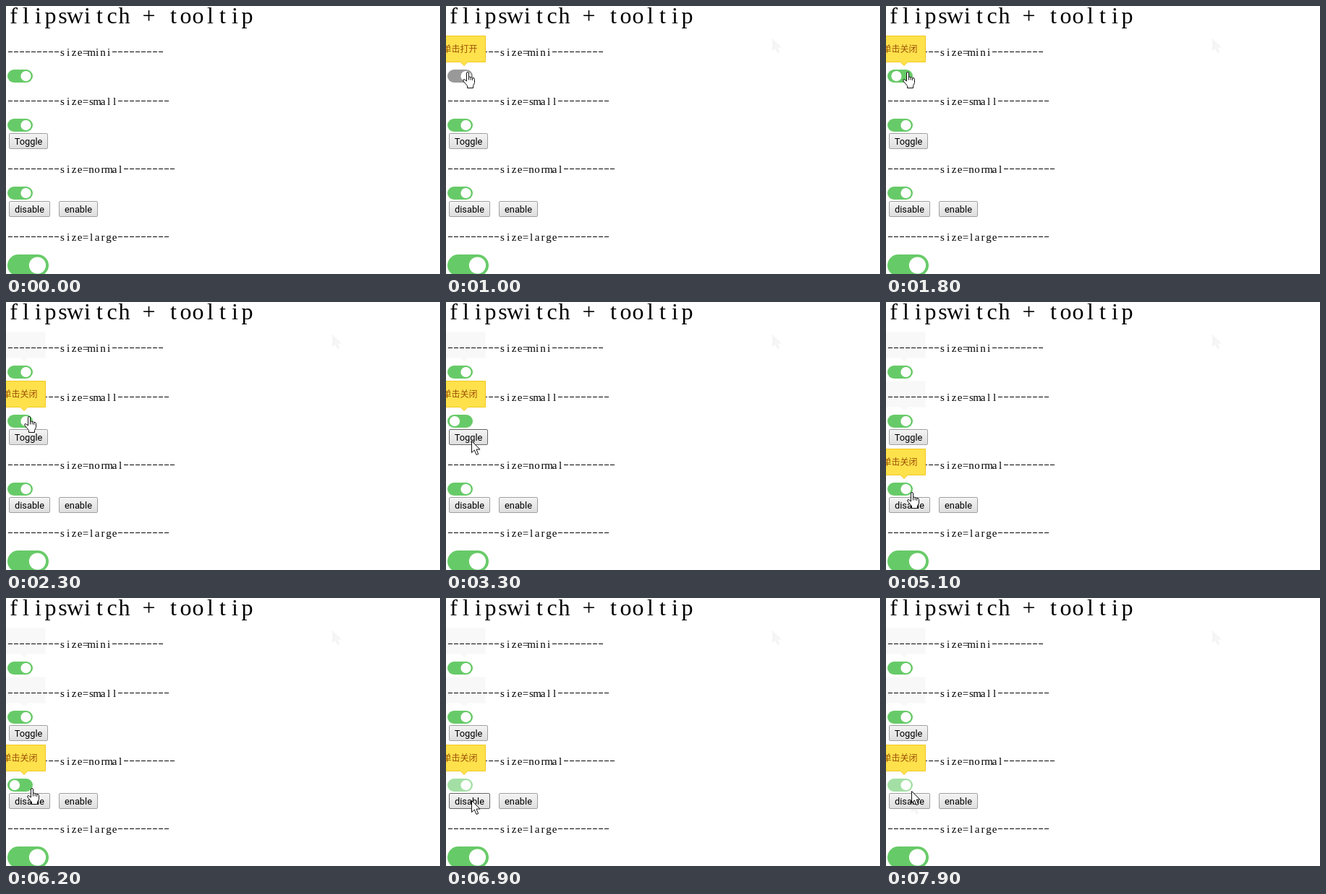
Animation, 600 px wide and 371 px high, one loop 8000 ms. Source, as an HTML page with a canvas:

```html
<!DOCTYPE html>
<html lang="en">
<head>
<meta charset="utf-8">
<title>flipswitch + tooltip</title>
<style>
  html, body { margin: 0; width: 100%; height: 100%; overflow: hidden; background: #fff; }
  canvas { display: block; }
</style>
</head>
<body>
<canvas id="stage" width="600" height="371"></canvas>
<script>
const ctx = document.getElementById('stage').getContext('2d');
const LOOP = 8000, STEP = 100;
const SERIF = '"Liberation Serif", serif';
const SANS = 'Roboto, sans-serif';
const CJK = '"Noto Sans CJK SC", "Noto Sans CJK", sans-serif';
const GHOST = '#f8f8f8', CURSOR_GHOST = '#f5f5f5';

// flips: [start, duration]; every flip inverts the switch, which begins on.
const switches = [
  { name: 'mini', label: 69, top: 88, flips: [[1000, 400], [1700, 400]], tip: [500, 2200] },
  { name: 'small', label: 137, top: 156, flips: [[2600, 400], [3300, 300], [4000, 300], [4500, 300]], tip: [2100, 5000] },
  { name: 'normal', label: 231, top: 250, flips: [[5600, 400], [6200, 400]], tip: [4900, LOOP], disabledAt: 6900 },
  { name: 'large', label: 325, top: 344, width: 57, height: 30, radius: 11.6, flips: [] }
];

const buttons = [
  { text: 'Toggle', x: 4, y: 176, w: 54, hover: [3200, 4900], presses: [[3200, 3300], [3800, 4000]] },
  { text: 'disable', x: 4, y: 270, w: 57, hover: [6600, 7100], presses: [[6800, 6900]] },
  { text: 'enable', x: 73, y: 270, w: 54, hover: [0, 0], presses: [] }
];

// [start, kind, x, y]
const cursorKeys = [
  [0, null, 0, 0],
  [300, 'arrow', 451, 45],
  [400, 'hand', 23, 91],
  [2200, 'hand', 25, 158],
  [2400, 'hand', 25, 161],
  [3200, 'arrow', 35, 192],
  [4900, 'arrow', 35, 225],
  [5000, 'hand', 29, 263],
  [6600, 'arrow', 35, 280],
  [7100, 'arrow', 35, 274],
  [7200, 'arrow', 35, 270],
  [7300, 'no', 35, 267],
  [7900, 'arrow', 35, 267]
];

const arrowPath = new Path2D('M.5 .5V16.6L4.3 13L7 19.5L9.7 18.4L7 12.1H12Z');
const handPath = new Path2D('M5.5 13V2Q5.5 .5 7 .5Q8.5 .5 8.5 2V7.5Q9.8 6.3 11.2 7.8' +
  'Q12.6 7 13.7 8.6Q16.5 8 16.5 10.5V15.5L14.5 19.5V22.5H6.5V19.5L1 13Q0 10.5 2.2 10.5Z');
const knucklePath = new Path2D('M8.5 7.5V11.5M11.2 8V11.5M13.7 8.6V12');
const tipPath = new Path2D('M-9 .5H54.5V36.5H30L25 41.5L20 36.5H-9Z');

const within = (t, [from, to]) => t >= from && t < to;
const clamp = v => Math.max(0, Math.min(1, v));

function write(text, x, y, font, color = '#000', align = 'left') {
  ctx.font = font;
  ctx.fillStyle = color;
  ctx.textAlign = align;
  ctx.fillText(text, x, y);
}

// Sets each letter in the middle of a fixed-width cell.
function writeGrid(text, x, y, cell, size) {
  [...text].forEach((letter, i) =>
    write(letter, x + (i + 0.5) * cell, y, `${size}px ${SERIF}`, '#000', 'center'));
}

function shape(path, x, y, fill, stroke) {
  ctx.save();
  ctx.translate(x, y);
  ctx.fillStyle = fill;
  ctx.fill(path);
  if (stroke) {
    ctx.lineWidth = 1;
    ctx.strokeStyle = stroke;
    ctx.stroke(path);
  }
  ctx.restore();
}

function rule(x, y) {
  ctx.fillStyle = '#000';
  for (let i = 0; i < 9; i++) ctx.fillRect(x + i * 8 + 1, y, 6, 1);
}

function drawLabel({ name, label }) {
  const text = 'size=' + name;
  rule(2, label - 6);
  writeGrid(text, 74, label, 8, 15);
  rule(74 + text.length * 8, label - 6);
}

// on: logical state; pos: knob position, 1 at the right
function stateAt(sw, t) {
  let on = true, pos = 1;
  for (const [start, duration] of sw.flips) {
    if (t < start) break;
    on = !on;
    const p = clamp((t - start) / duration);
    const eased = p * p * (3 - 2 * p);
    pos = on ? eased : 1 - eased;
  }
  return { on, pos };
}

function drawSwitch(sw, t) {
  const { top, width = 35, height = 18, radius = 7.1 } = sw;
  const { on, pos } = stateAt(sw, t);
  const inset = height / 2 + 1;
  ctx.globalAlpha = t >= sw.disabledAt ? 0.6 : 1;
  ctx.fillStyle = on ? '#67ca68' : '#999';
  ctx.beginPath();
  ctx.roundRect(2, top, width, height, height / 2);
  ctx.fill();
  ctx.globalAlpha = 1;
  ctx.fillStyle = '#fff';
  ctx.beginPath();
  ctx.arc(2 + inset + pos * (width - 2 * inset + 0.5), top + height / 2, radius, 0, 7);
  ctx.fill();
}

function drawTip(sw, t) {
  if (!sw.tip || !within(t, sw.tip)) return;
  const y = sw.top - 47;
  ctx.globalAlpha = clamp((t - sw.tip[0]) / 200);
  shape(tipPath, 0, y, '#ffe14c', '#f2c81c');
  write(stateAt(sw, t).on ? '单击关闭' : '单击打开', -4.5, y + 23, '12px ' + CJK, '#9c5006');
  ctx.globalAlpha = 1;
}

function drawButton({ text, x, y, w, hover, presses }, t) {
  const pressed = presses.some(span => within(t, span));
  const shade = ctx.createLinearGradient(0, y, 0, y + 22);
  shade.addColorStop(0, pressed ? '#dcdcdc' : '#f5f5f5');
  shade.addColorStop(1, pressed ? '#eee' : '#dddddd');
  ctx.fillStyle = shade;
  ctx.strokeStyle = within(t, hover) ? '#666' : '#a0a0a0';
  ctx.lineWidth = 1;
  ctx.beginPath();
  ctx.roundRect(x + 0.5, y + 0.5, w - 1, 21, 1.5);
  ctx.fill();
  ctx.stroke();
  write(text, x + w / 2, y + 16, '12.8px ' + SANS, '#000', 'center');
}

function drawGhosts(t) {
  for (const sw of switches) {
    if (sw.tip && t >= sw.tip[1]) shape(tipPath, 0, sw.top - 47, GHOST);
  }
  if (t >= 400) shape(arrowPath, 451, 45, CURSOR_GHOST, CURSOR_GHOST);
  if (t >= 7100) shape(arrowPath, 35, 280, CURSOR_GHOST, CURSOR_GHOST);
}

function drawNo(x, y) {
  for (const [color, width] of [['#fff', 4], ['#222', 2]]) {
    ctx.strokeStyle = color;
    ctx.lineWidth = width;
    ctx.beginPath();
    ctx.arc(x, y, 5.5, 0, 7);
    ctx.moveTo(x - 3.8, y - 3.8);
    ctx.lineTo(x + 3.8, y + 3.8);
    ctx.stroke();
  }
}

function drawCursor(t) {
  const [, kind, x, y] = cursorKeys.filter(key => key[0] <= t).pop();
  if (kind === 'arrow') shape(arrowPath, x, y, '#fff', '#111');
  if (kind === 'no') drawNo(x, y);
  if (kind === 'hand') {
    shape(handPath, x, y, '#fff', '#111');
    shape(knucklePath, x, y, 'transparent', '#111');
  }
}

function draw(t) {
  ctx.fillStyle = '#fff';
  ctx.fillRect(0, 0, 600, 371);
  drawGhosts(t);
  writeGrid('flipswitch + tooltip', 2, 24, 17, 32);
  switches.forEach(drawLabel);
  switches.forEach(sw => drawSwitch(sw, t));
  buttons.forEach(button => drawButton(button, t));
  switches.forEach(sw => drawTip(sw, t));
  drawCursor(t);
}

let origin;
function tick(now) {
  origin ??= now;
  draw(Math.floor(((now - origin) % LOOP) / STEP) * STEP);
  requestAnimationFrame(tick);
}
draw(0);
requestAnimationFrame(tick);
</script>
</body>
</html>
```
